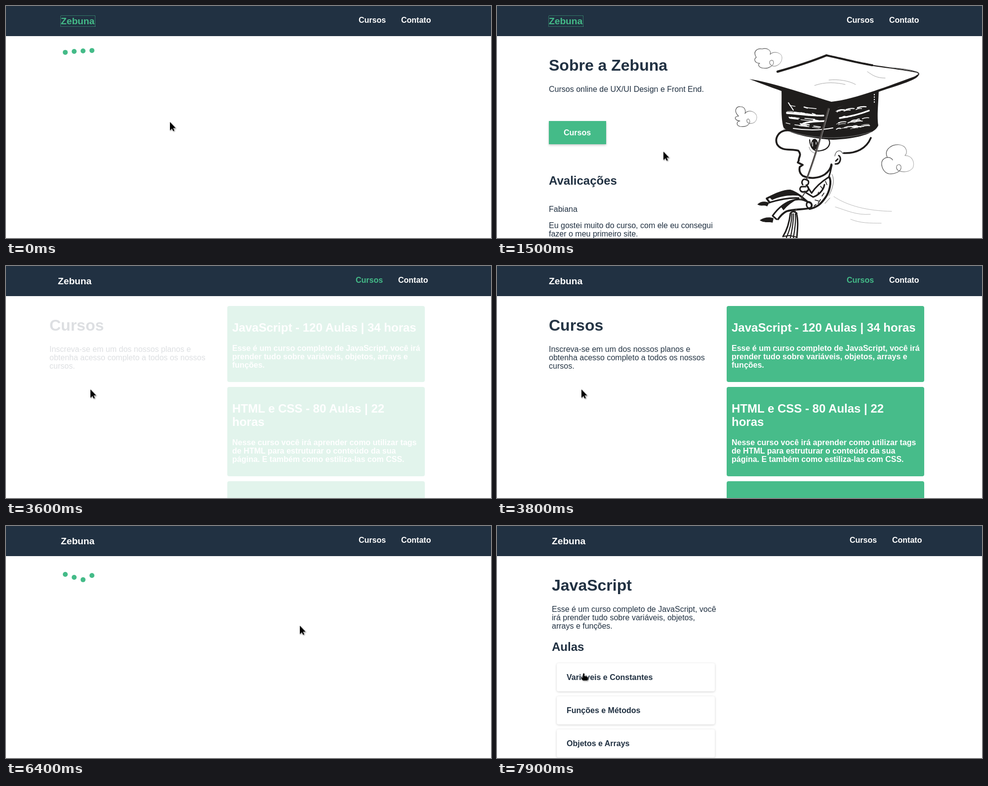
Write an HTML page that moves like this. It is 982 by 470 pixels and loops after 8 s.

```html
<!DOCTYPE html>
<html lang="pt-BR">
<head>
<meta charset="utf-8">
<title>Cursos</title>
<style>
html, body { margin: 0; width: 100%; height: 100%; overflow: hidden; background: #fff; }
svg { display: block; font-family: "Liberation Sans", Arial, sans-serif; font-size: 16px; fill: #213142; }
.b { font-weight: bold; }
.h1 { font-weight: bold; font-size: 32px; }
.h2 { font-weight: bold; font-size: 24px; }
.logo { font-weight: bold; font-size: 19.2px; }
.white { fill: #fff; }
.green { fill: #4b8; }
.box { fill: #fff; filter: drop-shadow(0 1px 2px rgba(0,0,0,.18)); }
.button { fill: #4b8; filter: drop-shadow(0 2px 2px rgba(0,0,0,.22)); }
.dotted { fill: none; stroke-dasharray: 1 1; shape-rendering: crispEdges; }
.ink { fill: none; stroke: #1f1d1c; stroke-linecap: round; stroke-linejoin: round; }
.solid { fill: #1f1d1c; stroke: none; }
.cursor { fill: #000; stroke: #fff; stroke-width: 1; paint-order: stroke; filter: drop-shadow(1px 1px 1px rgba(0,0,0,.45)); }
</style>
</head>
<body>
<svg id="stage" width="982" height="470" viewBox="0 0 982 470"></svg>
<script>
const LOOP = 8000;
const stage = document.getElementById('stage');

function add(parent, tag, attrs = {}, text) {
  const node = document.createElementNS('http://www.w3.org/2000/svg', tag);
  for (const key in attrs) node.setAttribute(key, attrs[key]);
  if (text) node.textContent = text;
  parent.append(node);
  return node;
}
const group = (parent = stage) => add(parent, 'g');
const rect = (parent, x, y, width, height, attrs) => add(parent, 'rect', { x, y, width, height, ...attrs });
const show = (node, on) => node.setAttribute('display', on ? 'inline' : 'none');
function write(parent, x, y, cls, lines, step = 17) {
  return [].concat(lines).map((line, i) => add(parent, 'text', { x, y: y + i * step, class: cls }, line))[0];
}
function ink(parent, width, d, color = '#1f1d1c') {
  return add(parent, 'path', { class: 'ink', d, 'stroke-width': width, stroke: color, style: `stroke:${color}` });
}
const solid = (parent, d) => add(parent, 'path', { class: 'solid', d });

function randomFrom(seed) {
  return () => (seed = (seed * 16807) % 2147483647) / 2147483647;
}

function drawClouds(g) {
  [
    'M525 104C517 92 527 85 537 87C547 84 556 90 553 98C560 90 578 94 577 106C576 118 566 122 560 122C547 119 552 106 559 111C564 121 548 127 541 126C530 126 527 118 532 116C522 116 519 108 525 104',
    'M489 223C478 212 485 203 493 204C502 204 504 212 502 218C508 208 527 214 526 226C525 238 514 240 507 236C503 228 511 226 512 234C510 244 500 245 492 244C482 241 487 232 492 233C482 232 478 224 489 223',
    'M790 306C783 290 800 280 814 281C830 283 832 297 826 303C842 303 846 318 842 328C834 338 820 337 812 333C803 325 815 316 818 325C820 336 804 341 794 340C780 338 774 316 783 310C788 305 798 306 801 312'
  ].forEach(d => ink(g, 1.2, d, 'url(#cloudInk)'));
}

function drawCap(g) {
  ink(g, 4.5, 'M568 133C600 124 640 111 667 100');
  ink(g, 4, 'M667 100C695 106 730 115 760 120').setAttribute('stroke-dasharray', '9 .5 5 1');
  ink(g, 2, 'M758 120C790 125 825 129 850 134Q858 138 850 141');
  ink(g, 1, 'M795 125C820 126 855 131 854 138', '#555');
  solid(g, 'M576 171L668 206L690 206L773 170C772 200 769 225 772 242C765 260 725 269 680 271C640 269 590 259 580 246C574 225 577 195 576 171Z');

  // Dry brush streaks across the band.
  const random = randomFrom(77);
  for (let i = 0; i < 64; i++) {
    const left = i % 2;
    const x = left ? 584 + random() * 66 : 686 + random() * 56;
    const row = Math.floor(random() * 4);
    const bend = left ? (x - 584) * 0.13 : (755 - x) * 0.15;
    const y = (left ? 198 : 202) + row * 12 + bend + random() * 5;
    const length = 6 + random() * 14;
    const slope = left ? 2 : -2;
    ink(g, 0.7 + random() * 1.7, `M${x} ${y}q${length / 2} ${slope - 1} ${length} ${slope}`, '#fff');
  }
  ink(g, 3.4, 'M587 217C610 218 635 223 661 222M620 238C635 233 650 234 664 233M694 227C715 224 735 219 753 212', '#fff');
  ink(g, 2, 'M590 196L600 211M600 248C625 252 655 252 680 247', '#fff');
  ink(g, 2, 'M764 174V196', '#fff').setAttribute('stroke-dasharray', '1 4');

  solid(g, 'M511 148C550 153 620 177 677 194C720 190 790 163 845 143L854 138C855 149 815 159 775 173L690 206L668 208C630 190 575 173 511 148Z');
  ink(g, 1, 'M643 161C665 153 688 155 705 159M672 150C690 148 712 151 726 159M750 133C760 140 768 146 786 146', '#aaa');
  ink(g, 1, 'M580 249C620 266 690 276 758 255', '#777');
}

function drawBoy(g) {
  ink(g, 3.8, 'M592 252C570 250 562 268 567 280C576 295 594 289 610 293C618 302 610 306 611 313L609 317L619 322L613 326C611 334 614 340 619 344C634 351 652 349 664 341C672 335 676 328 677 321');
  ink(g, 2.2, 'M633 271C634 288 642 296 656 293C672 290 676 279 672 271');
  add(g, 'ellipse', { cx: 643, cy: 280, rx: 7, ry: 11, class: 'solid' });
  ink(g, 1.4, 'M639 276V284M646 276V280', '#fff');
  ink(g, 1, 'M632 286C634 294 638 296 643 298', '#777');
  ink(g, 3, 'M692 303C698 306 696 321 685 320M690 310L686 314');
  ink(g, 1.2, 'M684 304C686 291 696 291 700 299', '#555');
  ink(g, 3.5, 'M702 298C727 299 748 289 757 267');
  ink(g, 3, 'M678 322C676 332 674 340 672 346');
  ink(g, 4, 'M673 347C678 357 673 377 665 388C656 401 648 408 633 411');
  ink(g, 3.2, 'M671 347C654 358 644 368 637 379L628 365M663 362C661 374 650 384 640 387L622 376');
  ink(g, 1, 'M678 341C684 350 681 368 672 384M674 389L664 400', '#666');
  ink(g, 1.6, 'M655 365l4 5M665 355l3 7M651 377l-2 6M662 379l-4 6M644 393l7 2M655 392l-5 8M646 402l-4 3');
  ink(g, 3, 'M619 362C615 356 620 348 626 352C633 353 632 362 626 363C633 367 632 376 624 376C615 379 610 371 616 366L625 366');
  ink(g, 3.8, 'M635 409C620 413 600 411 586 416C578 420 574 425 569 432M635 409C640 403 636 397 629 397C615 385 605 377 594 374C578 374 562 382 546 390L552 398');
  solid(g, 'M552 388C570 377 590 370 604 377L620 386C602 382 578 383 557 393Z');
  ink(g, 3.2, 'M552 398C575 391 592 388 611 389M558 425C570 408 585 397 598 394C611 390 621 392 629 397M558 425L566 432');
  solid(g, 'M575 407Q591 392 611 390Q591 400 580 414Z');
  ink(g, 3, 'M629 397C624 403 628 410 634 410');
  solid(g, 'M527 402C534 395 545 395 551 399L547 406C540 402 536 407 527 402ZM532 434C540 428 552 427 560 430L558 439C550 436 542 441 532 434Z');
  ink(g, 3, 'M671 208C659 253 646 300 627 350', '#4a4543');
  ink(g, 1, 'M673 208C661 253 648 300 629 350', '#999');
  ink(g, 2, 'M624 377L614 393M606 412L602 418', '#4a4543');
  ink(g, 3, 'M594 420C592 438 586 456 579 467M606 419C611 436 608 455 607 470M594 420Q600 413 607 420');
  ink(g, 2.2, 'M597 421C597 440 591 458 586 469M600 421C601 440 596 459 594 470M604 421C606 439 602 457 600 470M579 467L592 465L606 468');
  ink(g, 1, 'M682 386C710 405 750 415 799 416M685 407C710 415 728 424 756 422M716 432C735 440 755 440 778 440', '#bbb');
}

function buildAbout() {
  const g = group();
  write(g, 105, 131, 'h1', 'Sobre a Zebuna');
  write(g, 105, 174, '', 'Cursos online de UX/UI Design e Front End.');
  rect(g, 105, 233, 116, 47, { class: 'button' });
  write(g, 135, 262, 'b white', 'Cursos');
  write(g, 105, 362, 'h2', 'Avalicações');
  write(g, 105, 417, '', 'Fabiana');
  write(g, 105, 450, '', ['Eu gostei muito do curso, com ele eu consegui', 'fazer o meu primeiro site.']);
  drawClouds(g);
  drawCap(g);
  drawBoy(g);
  return g;
}

function buildCourses() {
  const g = group();
  write(g, 105, 131, 'h1', 'Cursos');
  write(g, 105, 174, '', ['Inscreva-se em um dos nossos planos e', 'obtenha acesso completo a todos os nossos', 'cursos.']);
  [[81, 154], [245, 181], [436, 154]].forEach(([y, h]) => rect(g, 465, y, 400, h, { rx: 4, class: 'green' }));
  write(g, 475, 133, 'h2 white', 'JavaScript - 120 Aulas | 34 horas');
  write(g, 475, 172, 'b white', ['Esse é um curso completo de JavaScript, você irá', 'prender tudo sobre variáveis, objetos, arrays e', 'funções.']);
  write(g, 475, 297, 'h2 white', ['HTML e CSS - 80 Aulas | 22', 'horas'], 27);
  write(g, 475, 363, 'b white', ['Nesse curso você irá aprender como utilizar tags', 'de HTML para estruturar o conteúdo da sua', 'página. E também como estiliza-las com CSS.']);
  return g;
}

function buildLessons() {
  const g = group();
  write(g, 111, 131, 'h1', 'JavaScript');
  write(g, 111, 174, '', ['Esse é um curso completo de JavaScript, você', 'irá prender tudo sobre variáveis, objetos,', 'arrays e funções.']);
  write(g, 111, 253, 'h2', 'Aulas');
  ['Variáveis e Constantes', 'Funções e Métodos', 'Objetos e Arrays'].forEach((name, i) => {
    rect(g, 121, 278 + 67 * i, 320, 57, { rx: 4, class: 'box' });
    write(g, 141, 312 + 67 * i, 'b', name);
  });
  return g;
}

const gradient = add(add(stage, 'defs'), 'linearGradient', { id: 'cloudInk' });
add(gradient, 'stop', { offset: 0.35, 'stop-color': '#555' });
add(gradient, 'stop', { offset: 1, 'stop-color': '#bbb' });

// Each step is [time, progress of the entering page].
const pages = [
  { node: buildAbout(), end: 2500, scrolls: true, steps: [[800, .8], [900, .98], [1500, 1]] },
  { node: buildCourses(), end: 5600, scrolls: true, steps: [[3600, .15], [3700, .77], [3800, .98], [4000, 1]] },
  { node: buildLessons(), end: LOOP, scrolls: false, steps: [[6700, .45], [6800, .98], [7000, 1]] }
];

rect(stage, 0, 0, 982, 61);
const nav = group();
const logo = write(nav, 111, 37, 'logo', 'Zebuna');
const coursesLink = write(nav, 714, 34, 'b', 'Cursos');
write(nav, 800, 34, 'b white', 'Contato');
const logoFocus = rect(nav, 110.5, 19.5, 70, 22, { class: 'dotted', stroke: '#4b8' });
const cardFocus = rect(stage, 464.5, 80.5, 401, 155, { class: 'dotted', stroke: '#213142' });

const loader = group();
const dots = [0, 1, 2, 3].map(i => add(loader, 'circle', { cx: 120 + 18 * i, r: 5, class: 'green' }));
// Start delay and half period of each dot, in ms.
const bounce = [[324, 294], [344, 312], [357, 333], [387, 265]];

const arrow = add(stage, 'path', { class: 'cursor', d: 'M0 0V17L4 13.3L6.5 18.5L8.8 17.4L6.4 12.3H11.5Z' });
const hand = add(stage, 'path', { class: 'cursor', d: 'M5 2.5Q6.5 .5 8 2.5V7L13 8Q15 8.5 15 10.5V13L14 16H5L1.5 11.5Q.8 8.5 3 9L5 10.5Z' });
const track = [
  [0, 332, 235], [500, 337, 295], [1700, 337, 295], [1800, 262, 258], [1900, 201, 232], [2000, 201, 232],
  [2300, 171, 250], [4100, 171, 250], [4400, 227, 229], [4500, 227, 229],
  [5100, 595, 202], [7400, 595, 202], [7900, 169, 297], [LOOP, 169, 297]
];

function cursorAt(t) {
  const i = track.findIndex(point => point[0] > t);
  const [t0, x0, y0] = track[i - 1], [t1, x1, y1] = track[i];
  const k = (t - t0) / (t1 - t0);
  return [x0 + (x1 - x0) * k, y0 + (y1 - y0) * k];
}

function render(time) {
  const t = Math.floor((time % LOOP) / 100) * 100;
  const page = pages.find(p => t >= p.steps[0][0] && t < p.end);
  pages.forEach(p => show(p.node, p === page));
  if (page) {
    const progress = page.steps.filter(step => step[0] <= t).pop()[1];
    page.node.setAttribute('opacity', progress);
    page.node.setAttribute('transform', `translate(${progress > .95 ? 0 : -20 * (1 - progress)} 0)`);
  }

  nav.setAttribute('transform', `translate(${page && page.scrolls ? -6 : 0} 0)`);
  logo.setAttribute('class', t < 2500 ? 'logo green' : 'logo white');
  coursesLink.setAttribute('class', t >= 2500 && t < 5600 ? 'b green' : 'b white');
  show(logoFocus, t < 2500);
  show(cardFocus, t >= 5400 && t < 5600);

  show(loader, !page);
  const age = t < 2500 ? t + 400 : t - (t < 5600 ? 2500 : 5600);
  dots.forEach((dot, i) => {
    const [delay, half] = bounce[i];
    const phase = Math.max(0, age - delay) / half;
    dot.setAttribute('cy', 90 + 12.5 * (1 - Math.cos(Math.PI * phase)));
  });

  const [x, y] = cursorAt(t);
  const overLink = (t >= 1900 && t < 2500) || (t >= 4500 && t < 5600 && x > 465) || (t >= 7800 && y > 278);
  show(hand, overLink);
  show(arrow, !overLink);
  (overLink ? hand : arrow).setAttribute('transform', `translate(${Math.round(x)} ${Math.round(y)})`);
}

const start = performance.now();
function tick() {
  render(performance.now() - start);
  requestAnimationFrame(tick);
}
tick();
</script>
</body>
</html>
```
